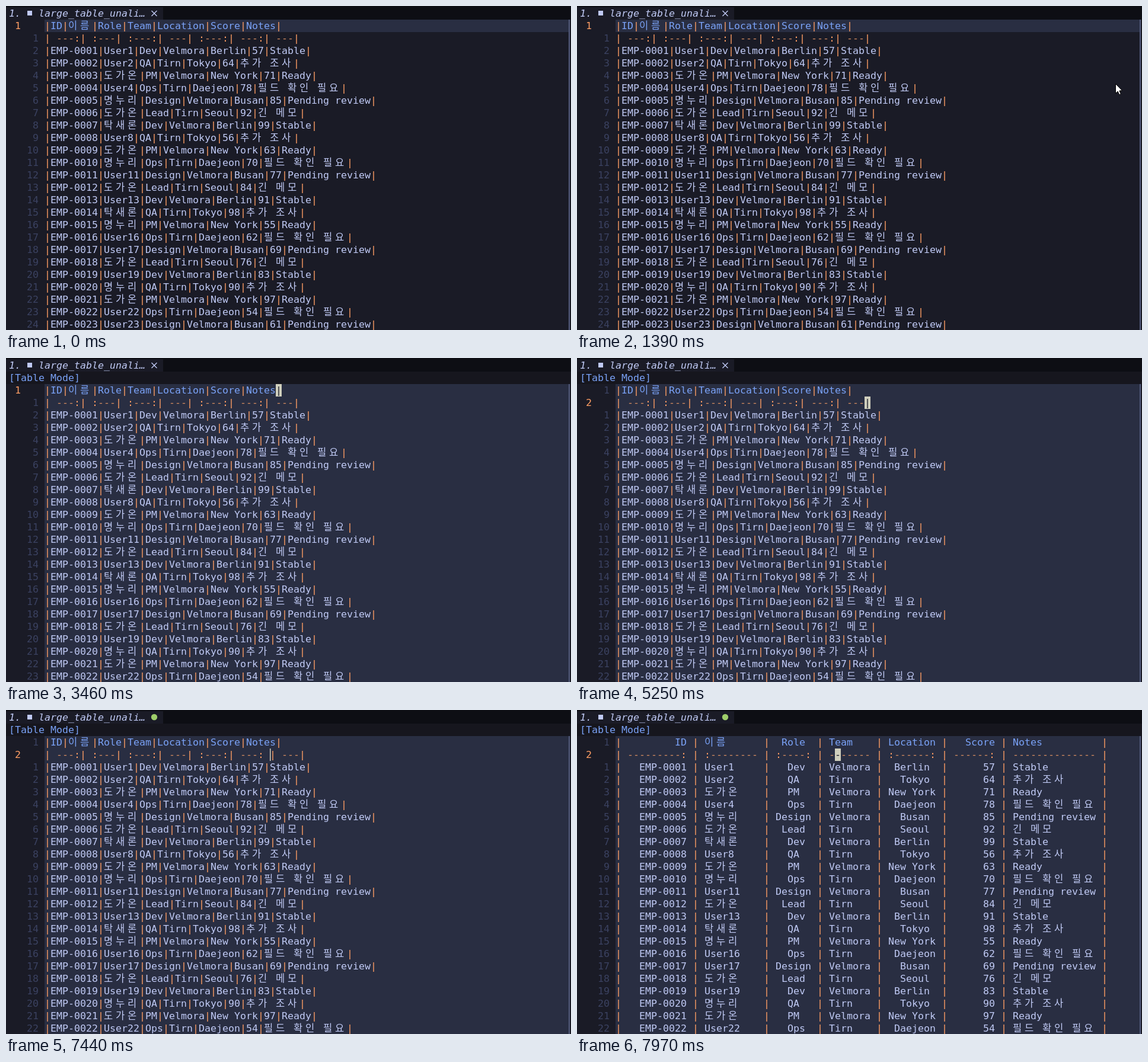
Recreate the animation shown at these times as an HTML page with a canvas. Size 953 px wide and 547 px high, loop 8 s.

```html
<!DOCTYPE html>
<html lang="en">
<head>
<meta charset="utf-8">
<title>Table editor</title>
<style>
  html, body { margin: 0; width: 100%; height: 100%; overflow: hidden; background: #1a1b26; }
  canvas { display: block; width: 953px; height: 547px; }
</style>
</head>
<body>
<canvas id="stage" width="953" height="547"></canvas>
<script>
const ctx = document.getElementById('stage').getContext('2d');
const W = 953, H = 547, LOOP = 8000;
const CELL = 10, LINE = 21, LEFT = 65, TOP = 23;
const FONT = '16.6px "DejaVu Sans Mono", "Noto Sans CJK KR", monospace';
const C = {
  bg: '#1a1b26', bar: '#0d0e14', mode: '#16161e', active: '#292e42',
  text: '#c0caf5', blue: '#7aa2f7', orange: '#ff9e64', dash: '#d18a60',
  number: '#3b4261', edge: '#545c7e', cursor: '#d0cfbd', green: '#9ece6a'
};

const HEADER = ['ID', '이름', 'Role', 'Team', 'Location', 'Score', 'Notes'];
const RULE = '| ---:| :---| :---:| ---| :---:| ---:| ---|';
const ROLES = ['Dev', 'QA', 'PM', 'Ops', 'Design', 'Lead'];
const TEAMS = ['Velmora', 'Tirn'];
const CITIES = ['Berlin', 'Tokyo', 'New York', 'Daejeon', 'Busan', 'Seoul'];
const NOTES = ['Stable', '추가 조사', 'Ready', '필드 확인 필요', 'Pending review', '긴 메모'];
const WIDTHS = [10, 9, 6, 7, 8, 7, 14];
const ALIGN = 'rlclcrl';

function person(i) {
  if (i % 5 === 0) return '명누리';
  if (i % 3 === 0) return '도가온';
  if (i % 7 === 0) return '탁새론';
  return 'User' + i;
}

function record(i) {
  const k = i - 1;
  return ['EMP-' + String(i).padStart(4, '0'), person(i), ROLES[k % 6], TEAMS[k % 2],
    CITIES[k % 6], String(50 + 7 * i % 50), NOTES[k % 6]];
}

const isWide = ch => /[가-힣]/.test(ch);
const cells = s => [...s].reduce((n, ch) => n + (isWide(ch) ? 2 : 1), 0);

function pad(s, col) {
  const gap = WIDTHS[col] - cells(s);
  const before = { l: 0, c: Math.ceil(gap / 2), r: gap }[ALIGN[col]];
  return ' '.repeat(before) + s + ' '.repeat(gap - before);
}

const compact = row => '|' + row.join('|') + '|';
const aligned = row => '| ' + row.map(pad).join(' | ') + ' |';

function alignedRule() {
  return '| ' + WIDTHS.map((w, i) => {
    const a = ALIGN[i], start = i === 1 || a === 'c' ? ':' : '';
    const end = a === 'l' ? '' : ':';
    return start + '-'.repeat(w - start.length - end.length) + end;
  }).join(' | ') + ' |';
}

const ROWS = [HEADER, null, ...Array.from({ length: 23 }, (_, k) => record(k + 1))];
const TABLES = {
  compact: ROWS.map(r => r ? compact(r) : RULE),
  edited: ROWS.map(r => r ? compact(r) : RULE.slice(0, 37) + ' ' + RULE.slice(37)),
  aligned: ROWS.map(r => r ? aligned(r) : alignedRule())
};

// Each entry holds from its time until the next one.
const POINTER = [
  [390, 946, 446], [460, 938, 375], [520, 929, 300], [590, 922, 241],
  [1390, 908, 131], [1450, 892, 62], [1540, 866, 18], [1620, 838, 1],
  [1710, 808, 15], [1790, 793, 30], [2200, 721, 36], [2270, null]
];
const CARET = [
  [1870, 0, 39], [5250, 1, 42], [6050, 1, 41], [6250, 1, 40], [6380, 1, 39],
  [6580, 1, 38], [6710, 1, 37], [7040, 1, 37, 'bar'], [7370, 1, 38, 'bar'], [7850, 1, 37]
];
const at = (track, t) => track.filter(k => k[0] <= t).pop();

function rect(x, y, w, h, color) {
  ctx.fillStyle = color;
  ctx.fillRect(x, y, w, h);
}

function put(text, x, baseline, color) {
  for (const ch of text) {
    ctx.fillStyle = typeof color === 'function' ? color(ch) : color;
    if (ch !== ' ') ctx.fillText(ch, x, baseline);
    x += isWide(ch) ? 2 * CELL : CELL;
  }
}

function drawTab(modified) {
  rect(0, 0, W, TOP, C.bar);
  rect(0, 2, 265, TOP - 2, C.bg);
  ctx.font = 'italic ' + FONT;
  put('1.', 5, 18, C.text);
  put('large_table_unali…', 55, 18, C.text);
  ctx.font = FONT;
  rect(36, 8, 8, 8, C.text);
  ctx.beginPath();
  if (modified) {
    ctx.arc(250, 12, 5.2, 0, 7);
    ctx.fillStyle = C.green;
    ctx.fill();
  } else {
    ctx.moveTo(245.5, 8); ctx.lineTo(254.5, 17);
    ctx.moveTo(254.5, 8); ctx.lineTo(245.5, 17);
    ctx.strokeStyle = C.text;
    ctx.lineWidth = 1.4;
    ctx.stroke();
  }
}

function drawNumber(row, current, baseline) {
  if (row === current) put(String(row + 1), 15, baseline, C.orange);
  else put(String(Math.abs(row - current)).padStart(2), 35, baseline, C.number);
}

function drawCaret(caret, top) {
  const [, row, col, shape] = caret;
  const x = LEFT + col * CELL, y = top + row * LINE;
  if (shape) return rect(x, y, 1.5, LINE, C.cursor);
  return rect(x, y, CELL, LINE, C.cursor);
}

function drawPointer(x, y) {
  ctx.save();
  ctx.translate(x + 0.5, y + 0.5);
  ctx.beginPath();
  ctx.moveTo(0, 0);
  for (const [px, py] of [[0, 16], [3.7, 12.6], [6.2, 18.2], [8.8, 17], [6.4, 11.6], [11, 11.2]]) {
    ctx.lineTo(px, py);
  }
  ctx.closePath();
  ctx.fillStyle = '#fff';
  ctx.fill();
  ctx.strokeStyle = '#000';
  ctx.lineWidth = 1;
  ctx.stroke();
  ctx.restore();
}

function draw(t) {
  const tableMode = t >= 3460;
  const top = tableMode ? TOP + LINE : TOP;
  const lines = TABLES[t < 7370 ? 'compact' : t < 7970 ? 'edited' : 'aligned'];
  const caret = at(CARET, t), pointer = at(POINTER, t);
  const current = caret ? caret[1] : 0;

  rect(0, 0, W, H, C.bg);
  drawTab(t >= 7440);
  if (tableMode) {
    rect(0, TOP, W, LINE, C.mode);
    put('[Table Mode]', 5, TOP + 16, C.blue);
  }
  rect(LEFT, top, 884, tableMode ? H - top : LINE, C.active);
  rect(949, top, 2, H - top, C.edge);
  if (caret) drawCaret(caret, top);

  lines.forEach((line, row) => {
    const baseline = top + row * LINE + 16;
    const base = row === 0 ? C.blue : C.text;
    drawNumber(row, current, baseline);
    put(line, LEFT, baseline, ch =>
      ch === '|' ? C.orange : row !== 1 ? base : ch === '-' ? C.dash : C.orange);
  });

  if (caret && !caret[3]) {
    ctx.save();
    ctx.beginPath();
    ctx.rect(LEFT + caret[2] * CELL, top + current * LINE, CELL, LINE);
    ctx.clip();
    drawCaret(caret, top);
    put(lines[current], LEFT, top + current * LINE + 16, C.bg);
    // The header holds two wide letters, so its text is laid out in cells.
    ctx.restore();
  }
  if (pointer && pointer[1] !== null) drawPointer(pointer[1], pointer[2]);
}

const start = performance.now();
function tick() {
  draw((performance.now() - start) % LOOP);
  requestAnimationFrame(tick);
}
tick();
</script>
</body>
</html>
```
